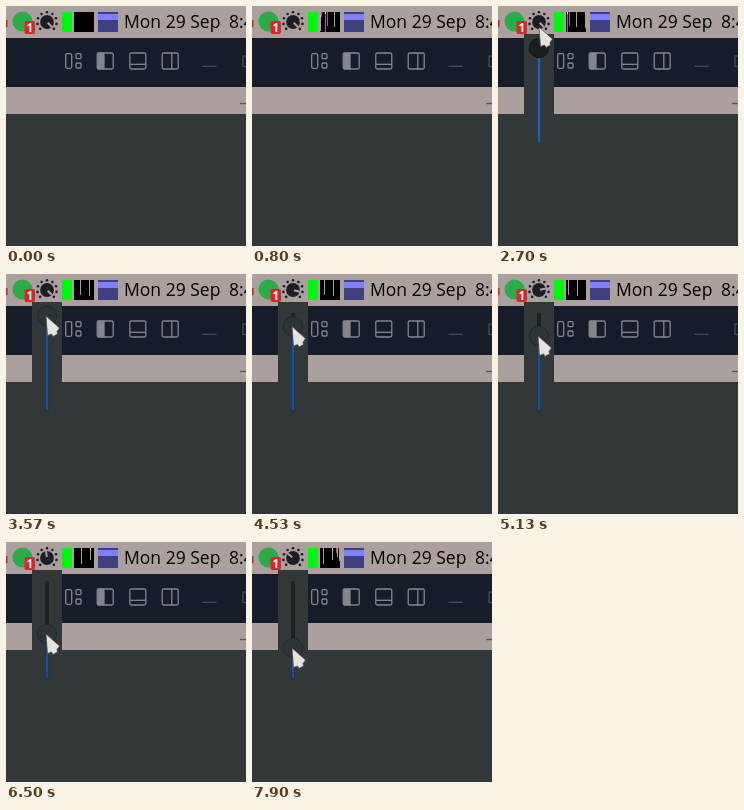
Recreate the animation shown at these times as an HTML page. Size 240 px wide and 240 px high, loop 8000 ms.

```html
<!DOCTYPE html>
<html lang="en">
<head>
<meta charset="utf-8">
<title>Brightness slider</title>
<style>
  html, body { margin: 0; width: 100%; height: 100%; overflow: hidden; background: #323739; }
  svg { display: block; width: 100vw; height: 100vh; }
  text { font-family: "Open Sans", "Noto Sans", sans-serif; white-space: pre; }
  .tools { fill: none; stroke: #85858d; stroke-width: 1.3; }
</style>
</head>
<body>
<svg viewBox="0 0 240 240">
  <rect width="240" height="240" fill="#323739"/>
  <rect width="240" height="108" fill="#aba09e"/>
  <rect y="32" width="240" height="49" fill="#161c2a"/>
  <path d="M234 97.5h6" stroke="#5c5656" stroke-width="1.4"/>

  <!-- tray -->
  <rect y="14" width="1.5" height="7" fill="#b32a2a"/>
  <circle cx="16.5" cy="15.5" r="10" fill="#2cab48"/>
  <rect x="18.500" y="15" width="10.500" height="13" rx="2" fill="#d8262c"/>
  <text x="23.7" y="26" font-size="11.5" font-weight="700" text-anchor="middle" fill="#fff">1</text>
  <g transform="translate(41 16)" fill="#1d1d24">
    <g id="dots"></g>
    <circle r="6.9"/>
    <path id="needle" d="M0 -1V-7" stroke="#aba09e" stroke-width="2"/>
  </g>
  <rect x="56" y="6" width="10" height="20" fill="#00f510"/>
  <rect x="68" y="6" width="20" height="20"/>
  <g id="graph" shape-rendering="crispEdges"></g>
  <rect x="92" y="6" width="20" height="20" fill="#404080"/>
  <path d="M92 8h20v6h-20z" fill="#8080ff"/>
  <g font-size="17.5">
    <text x="118" y="22">Mon 29 Sep</text>
    <text x="223" y="22">8:42</text>
  </g>

  <!-- window buttons -->
  <g class="tools">
    <rect x="59.700" y="47.700" width="6" height="14.600" rx="1.5"/>
    <rect x="70" y="47.7" width="5" height="5" rx="1.2"/>
    <rect x="70" y="57" width="5" height="5" rx="1.2"/>
    <rect x="91.2" y="47" width="16" height="16" rx="1.5"/>
    <path d="M92 47.5h6v15h-6z" fill="#85858d"/>
    <rect x="123.8" y="47" width="16" height="16" rx="1.5"/>
    <path d="M124 58.3h16"/>
    <rect x="156.2" y="47" width="16" height="16" rx="1.5"/>
    <path d="M165.8 47v16"/>
    <g stroke="#484c57">
      <path d="M196.5 60.3h14"/>
      <rect x="237" y="50" width="12" height="10.5"/>
    </g>
  </g>

  <g id="popup" stroke-linecap="round">
    <rect x="26" y="28" width="30" height="112" fill="#323839"/>
    <path d="M41 40.5V135" stroke="#1d2123" stroke-width="4"/>
    <path id="fill" stroke-width="3"/>
    <circle id="knob" cx="41" r="9.7"/>
  </g>
  <path id="cursor" d="M0 0L1.5 19.5L5.5 18L7 20.5L11.5 18L11 15.5L13.5 12Z"
    fill="#e6e2e0" stroke="#4a4848" stroke-width=".7" stroke-linejoin="round"/>
</svg>
<script>
const LOOP = 8000, OPEN = 2500, PRESS = 2970;
const TOP = 42, BOTTOM = 136;
// start ms, end ms, distance
const drags = [[3970, 4770, 15], [4830, 5630, 13], [5670, 6270, 22], [7300, 7730, 14]];

const $ = id => document.getElementById(id);
const set = (el, attrs) => {
  for (const k in attrs) el.setAttribute(k, attrs[k]);
};
const add = (parent, tag, attrs) => {
  const el = document.createElementNS('http://www.w3.org/2000/svg', tag);
  set(el, attrs);
  parent.append(el);
};
const part = (t, from, to) => Math.min(1, Math.max(0, (t - from) / (to - from)));
const mix = (a, b, p) => a + (b - a) * p;
const arc = p => Math.sin(Math.PI * p);
const rand = n => {
  const v = Math.sin(n * 12.9898 + 4.1) * 43758.5453;
  return v - Math.floor(v);
};

for (let i = 0; i < 9; i++) {
  const a = (-135 + i * 33.75) * Math.PI / 180;
  add($('dots'), 'circle', { cx: 9.7 * Math.sin(a), cy: -9.7 * Math.cos(a), r: 1.3 });
}

// The pointer sweeps past, returns to the dial, then holds the knob.
function pointer(t, knobY) {
  if (t < 1000) {
    const p = part(t, 0, 800);
    return [mix(200, 0, p), -24 + 62 * arc(p)];
  }
  if (t < 2700) {
    const p = 1 - (1 - part(t, 1200, 1970)) ** 3;
    return [mix(-14, 41, p), mix(-24, 21, p) + 26 * arc(p)];
  }
  const p = part(t, 2700, PRESS);
  return [mix(41, 40, p), mix(21, knobY, p)];
}

let shown = -1;
function drawGraph(step) {
  if (step === shown) return;
  shown = step;
  const g = $('graph');
  g.replaceChildren();
  for (let c = 0; c < 20; c++) {
    const k = step * 2 + c;
    if (rand(k) < 0.75) continue;
    const height = 2 + Math.round(rand(k + 50) * 18);
    const fill = rand(k + 90) > 0.5 ? '#b04cb4' : '#aba09e';
    add(g, 'rect', { x: 68 + c, y: 6, width: 1, height, fill });
    if (rand(k + 130) > 0.6) add(g, 'rect', { x: 68 + c, y: 6, width: 1, height: 2, fill: '#e8e43c' });
  }
}

function render(t) {
  const y = drags.reduce((sum, [from, to, d]) => sum + d * part(t, from, to), TOP);
  const level = (BOTTOM - y) / (BOTTOM - TOP);
  const held = t >= PRESS;
  const [px, py] = pointer(t, y);
  set($('needle'), { transform: `rotate(${-135 + 270 * level})` });
  $('popup').style.display = t >= OPEN ? '' : 'none';
  set($('fill'), { d: `M41 ${y}V135`, stroke: held ? '#1c5190' : '#2263ae' });
  set($('knob'), {
    cy: y,
    fill: held ? '#2d3437' : '#1b1e20',
    stroke: held ? '#22282c' : '#101213'
  });
  set($('cursor'), { transform: `translate(${px} ${py})` });
  drawGraph(Math.floor((t - 30) / 700));
}

const start = performance.now();
function frame() {
  render((performance.now() - start) % LOOP);
  requestAnimationFrame(frame);
}
frame();
</script>
</body>
</html>
```
